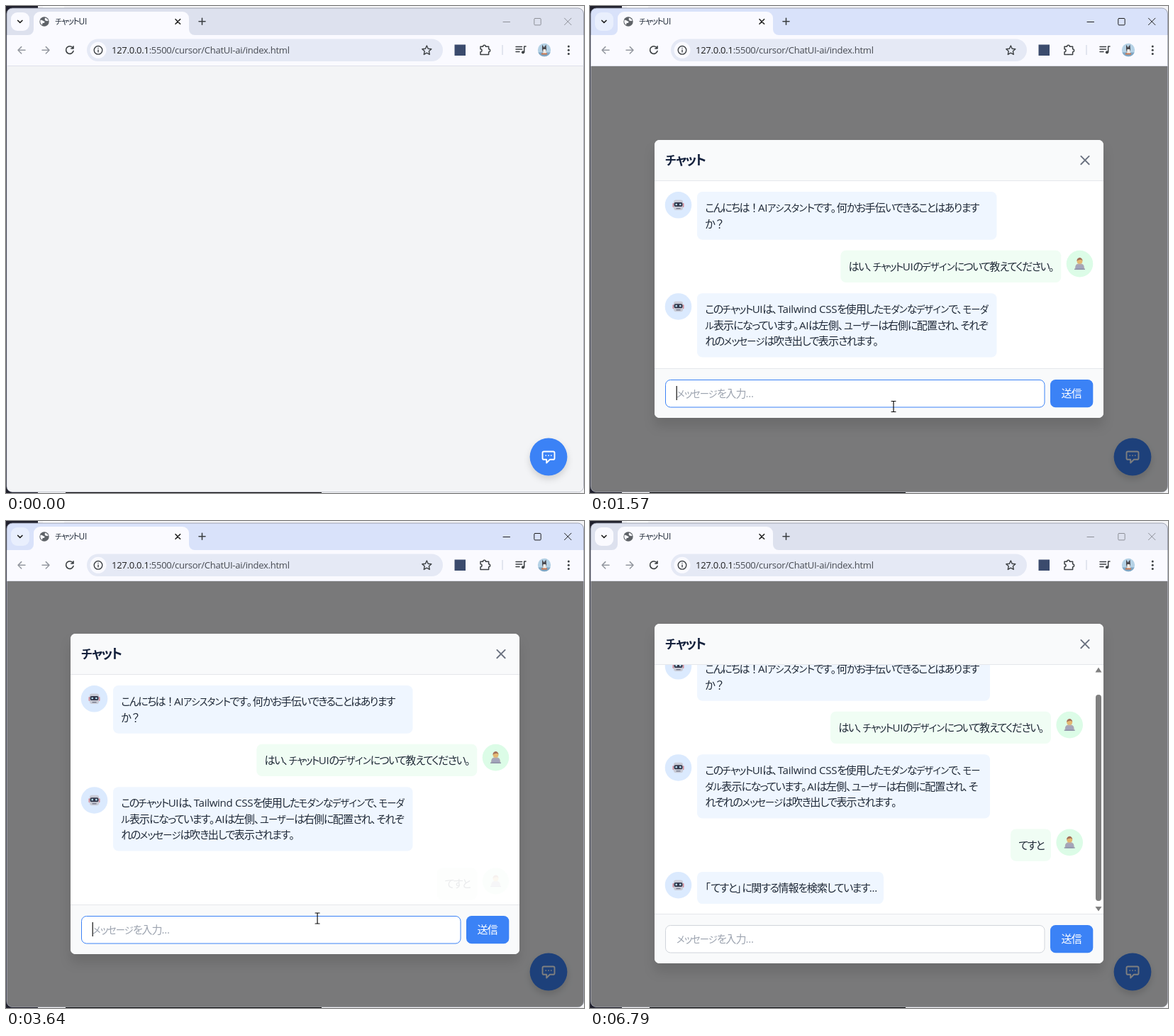
An HTML page for the animation above (6920 ms loop, 815x687 px).

```html
<!DOCTYPE html>
<html lang="ja">
<head>
<meta charset="utf-8">
<title>チャットUI</title>
<style>
html, body { margin: 0; width: 100%; height: 100%; overflow: hidden; background: #fff; }
svg { display: block; width: 815px; height: 687px; }
text { font: 15.07px "Open Sans", "Noto Sans CJK JP", "Noto Sans CJK", sans-serif; font-feature-settings: "palt"; fill: #1f2937; white-space: pre; }
.title { font-size: 18.84px; font-weight: 600; fill: #14213d; }
.kata { font-size: .88em; letter-spacing: -.06em; }
.hira { letter-spacing: -.11em; }
.kanji { letter-spacing: -.06em; }
.mark { letter-spacing: .04em; }
.wide { letter-spacing: -.14em; font-feature-settings: normal; }
.latin { letter-spacing: -.02em; }
.line { fill: none; stroke-linecap: round; stroke-linejoin: round; }
</style>
</head>
<body>
<svg id="stage" viewBox="0 0 815 687" xmlns="http://www.w3.org/2000/svg"></svg>
<script>
const LOOP = 6920, MID = 385, LEFT = 91, WIDTH = 633, PITCH = 22.6;
const HEIGHTS = { 3: 392, 4: 452, 5: 479 };
const $ = id => document.getElementById(id);
const set = (id, attrs) => { for (const k in attrs) $(id).setAttribute(k, attrs[k]); };
const show = (id, on) => set(id, { display: on ? 'inline' : 'none' });
const clamp = v => Math.max(0, Math.min(1, v));
const smooth = p => p * p * (3 - 2 * p);
const easeOut = p => 1 - Math.pow(1 - p, 1.7);

// Spacing follows the script: katakana is narrower than hiragana and kanji.
function kind(c) {
  if (/[ -~]/.test(c)) return 'latin';
  if (/[！？]/.test(c)) return 'wide';
  if (/[、。「」]/.test(c)) return 'mark';
  if (/[一-龠]/.test(c)) return 'kanji';
  return /[ァ-ヺー]/.test(c) && !/[ャュョット]/.test(c) ? 'kata' : 'hira';
}
function rich(s) {
  const runs = [];
  for (const c of s) {
    const k = kind(c), last = runs[runs.length - 1];
    if (last && last.k === k) last.s += c; else runs.push({ k, s: c });
  }
  return runs.map(r => `<tspan class="${r.k}">${r.s}</tspan>`).join('');
}
const text = (x, y, s, more = '') => `<text x="${x}" y="${y}" ${more}>${rich(s)}</text>`;
const rect = (x, y, w, h, fill, more = '') => `<rect x="${x}" y="${y}" width="${w}" height="${h}" fill="${fill}" ${more}/>`;
const circle = (x, y, r, fill, more = '') => `<circle cx="${x}" cy="${y}" r="${r}" fill="${fill}" ${more}/>`;
const line = (d, color, w = 1.5, more = '') => `<path class="line" d="${d}" stroke="${color}" stroke-width="${w}" ${more}/>`;
const fill = (d, color, more = '') => `<path d="${d}" fill="${color}" ${more}/>`;

const DARK = '#3c4043', GREY = '#9498a0';
const PAGE = 'M1.4 85h812.8v593a7.5 7.5 0 0 1-7.5 7.5H9a7.5 7.5 0 0 1-7.6-7.5z';

function chrome() {
  return rect(0, 0, 815, 687, '#f4f4f6') + rect(0, 0, 45, 687, '#20202c') +
    rect(52, 0, 30, 3, '#fff') + rect(84, 684, 361, 3, '#0c0c0e') +
    `<rect id="strip" x="1" y="3" width="813.5" height="682.5" rx="8" stroke="#8b90a0" stroke-width=".8"/>` +
    rect(1.4, 41, 812.8, 44, '#fafaff') +
    fill('M31 41a8 8 0 0 0 8-8V17a9 9 0 0 1 9-9h201a9 9 0 0 1 9 9v16a8 8 0 0 0 8 8z', '#fafaff') +
    `<rect id="drop" x="7" y="9" width="26" height="26" rx="9"/>` +
    line('M16.7 20.5l3.1 3 3.1-3', '#1f1f1f', 1.7) +
    circle(54, 22, 6.7, '#5f6368') +
    fill('M48.5 20c2.5-1 3 1 5 1.5s1 2.5-1 2.5-.5 2.5-2 2.5c-2-2-2.5-4-2-6.5zM55 16.8c2.5.5 4 2 4.5 4-1.5 1-2 0-3 0s-2.5-1.5-1.5-4z', '#fafaff') +
    text(69, 26.2, 'チャットUI', 'style="font-size:12px"') +
    line('M239 18.7l6.6 6.6m0-6.6l-6.6 6.6', '#1f1f1f', 1.6) +
    line('M272 21.7h9M276.5 17.2v9', DARK, 1.6) +
    `<path id="controls" class="line" stroke-width="1" d="M701 22.5h9.5M746 17.5h7a1.2 1.2 0 0 1 1.2 1.2v7a1.2 1.2 0 0 1-1.2 1.2h-7a1.2 1.2 0 0 1-1.2-1.2v-7a1.2 1.2 0 0 1 1.2-1.2zM787.5 17.2l9.5 9.5m0-9.5l-9.5 9.5"/>` +
    line('M27 62.3H17m4.7-4.7L17 62.3l4.7 4.7', GREY) +
    line('M51 62.3h10m-4.7-4.7l4.7 4.7-4.7 4.7', GREY) +
    line('M94.2 59a5.3 5.3 0 1 0 .8 4.5M95 56.8v3.2h-3.2', DARK, 1.6) +
    rect(114, 46.5, 502, 31.5, '#e5e9f5', 'rx="15.7"') + circle(130, 62.3, 11.5, '#fafaff') +
    circle(130, 62.3, 5.8, 'none', `stroke="${DARK}" stroke-width="1.4"`) + line('M130 61.9v3M130 59.5v.1', DARK, 1.4) +
    `<text x="149" y="67" class="latin" style="font-size:13px;fill:#474b52"><tspan fill="#1f1f1f">127.0.0.1</tspan>:5500/cursor/ChatUI-ai/index.html</text>` +
    line('M593.3 56l1.9 4.2 4.6.5-3.4 3.1.9 4.6-4-2.3-4 2.3.9-4.6-3.4-3.1 4.6-.5z', DARK, 1.4) +
    rect(632.5, 54.5, 15.5, 15.5, '#3b4b6d') +
    line('M669 57.2h3.6a1.9 1.9 0 0 1 3.8 0h4.2v3.6a2 2 0 0 1 0 4v3.7H669v-3.7a2 2 0 0 0 0-4z', DARK) +
    rect(699.5, 55, 1, 14, '#c9cfe0') +
    line('M719 57.5h8.5M719 61h8.5M719 64.5h5', DARK) +
    line('M730.7 65v-8h2.3', DARK) + circle(729, 65.3, 2.1, DARK) +
    circle(759, 62, 9.2, '#b5d2e6') +
    fill('M750.5 65.5h17a9.2 9.2 0 0 1-17 0z', '#7fa6c4') + fill('M756 54.5l2.5 4 3-4 .5 7-1.5 6h-3l-1.5-6z', '#4b4a50') +
    fill('M757.5 61h3.5l1 6h-5z', '#f0ede8') + rect(755, 66.5, 8, 2, '#c87852') +
    [57, 62.3, 67.6].map(y => circle(793.3, y, 1.5, DARK)).join('') +
    rect(1.4, 84, 812.8, 1, '#dfe1ea') +
    fill(PAGE, '#f3f4f6') +
    `<g style="filter:drop-shadow(0 5px 5px rgba(0,0,0,.14))"><circle id="fab" cx="765" cy="636" r="26.4"/></g>` +
    line('M8 10h.01M12 10h.01M16 10h.01M9 16H5a2 2 0 0 1-2-2V6a2 2 0 0 1 2-2h14a2 2 0 0 1 2 2v8a2 2 0 0 1-2 2h-5l-5 5v-5z',
      '#fff', 2, 'transform="translate(753.7 624.7) scale(.942)"') +
    fill(PAGE, '#000', 'id="shade" opacity=".5"');
}

const robot = rect(-8, -2.5, 3, 6, '#d58a97', 'rx="1"') + rect(5, -2.5, 3, 6, '#d58a97', 'rx="1"') +
  rect(-6.5, -7, 13, 14.5, '#c9cbd6', 'rx="3"') + rect(-6, -3.5, 12, 6, '#33384c', 'rx="2"') +
  circle(-2.8, -.5, 1.3, '#b9e2f4') + circle(2.8, -.5, 1.3, '#b9e2f4') + rect(-3, 4.5, 6, 1.3, '#6f7386');
const person = fill('M-6.5 7.5c0-6 2.5-7.5 6.5-7.5s6.5 1.5 6.5 7.5z', '#b3a9ae') +
  circle(0, -3.5, 4, '#e4b872') + fill('M-4-3.5a4 4.5 0 0 1 8-.5l-2-1.5-3.5.5z', '#a3705a') +
  rect(-5.5, 2.2, 11, 6, '#a3a5bb', 'rx="1"') + rect(-7.5, 7.2, 15, 1.3, '#8789a0');

const hello = ['こんにちは！AIアシスタントです。何かお手伝いできることはあります', 'か？'];
const about = 'このチャットUIは、Tailwind CSSを使用したモダンなデザインで、モーダル表示になっています。AIは左側、ユーザーは右側に配置され、それぞれのメッセージは吹き出しで表示されます。';
const cut = (s, ...ends) => {
  const at = ends.map(e => s.indexOf(e));
  return [s.slice(0, at[0]), s.slice(at[0], at[1]), s.slice(at[1])];
};

function messages(scrolls) {
  const wide = scrolls ? 413 : 422.5;
  return [
    { lines: hello, w: wide },
    { lines: ['はい、チャットUIのデザインについて教えてください。'], w: 311, mine: true },
    { lines: scrolls ? cut(about, 'ダル表', 'れぞれ') : cut(about, 'ル表', 'れのメ'), w: wide },
    { lines: ['てすと'], w: 57, mine: true },
    { lines: ['「てすと」に関する情報を検索しています...'], w: 263 }
  ];
}

function bubble(m, i, y, right) {
  const h = (m.lines.length + 1) * PITCH, x = m.mine ? right - 45 - m.w : 151;
  const face = m.mine ? right - 18.8 : 124.5;
  return `<g id="msg${i}">` + circle(face, y + 18.8, 18.8, m.mine ? '#dcfce7' : '#dbeafe') +
    `<g transform="translate(${face} ${y + 18.5})">${m.mine ? person : robot}</g>` +
    rect(x, y, m.w, h, m.mine ? '#f0fdf4' : '#eff6ff', 'rx="7.5"') +
    m.lines.map((s, n) => text(x + 11.3, y + 28 + n * PITCH, s)).join('') + '</g>';
}

const edge = (count, side) => Math.floor(MID + side * HEIGHTS[count] / 2);

function modal(count) {
  const scrolls = count === 5, top = edge(count, -1), end = edge(count, 1);
  const h = end - top, right = scrolls ? 695 : 709.3;
  let y = top + 73 - (scrolls ? 32 : 0), list = '';
  messages(scrolls).slice(0, count).forEach((m, i) => {
    list += bubble(m, i, y, right);
    y += (m.lines.length + 1) * PITCH + 15.07;
  });
  const bar = scrolls ? rect(713, 245, 8, 291, '#808080', 'rx="4"') +
    fill('M717 206.5l4.5 7h-9zM717 550.5l4.5-6.5h-9z', '#808080') : '';
  return `<clipPath id="card"><rect x="${LEFT}" y="${top}" width="${WIDTH}" height="${h}" rx="7"/></clipPath>` +
    `<clipPath id="body"><rect x="${LEFT}" y="${top + 58}" width="${WIDTH}" height="${h - 128}"/></clipPath>` +
    `<g style="filter:drop-shadow(0 12px 8px rgba(0,0,0,.11))"><g clip-path="url(#card)">` +
    rect(LEFT, top, WIDTH, h, '#fff') + rect(LEFT, top, WIDTH, 57, '#f9fafb') + rect(LEFT, end - 70, WIDTH, 70, '#f9fafb') +
    rect(LEFT, top + 57, WIDTH, 1, '#e5e7eb') + rect(LEFT, end - 70, WIDTH, 1, '#e5e7eb') + '</g></g>' +
    text(106, top + 35.3, 'チャット', 'class="title"') +
    line('M6 18L18 6M6 6l12 12', '#6b7280', 2, `transform="translate(686.7 ${top + 17.3}) scale(.942)"`) +
    `<g clip-path="url(#body)">${list}</g>${bar}` +
    `<rect id="field" x="106.5" y="${end - 53.5}" width="534.5" height="38.5" rx="7" fill="#fff" stroke-width="1"/>` +
    rect(649, end - 54, 60.3, 39.3, '#3b82f6', 'rx="7.5"') +
    text(664.5, end - 29, '送信', 'style="fill:#fff"') +
    text(122, end - 29, 'メッセージを入力...', 'id="hint" style="fill:#9ca3af"') +
    `<text id="typed" x="122" y="${end - 29}"></text>` +
    line('', '#1f2937', 1, 'id="under" stroke-dasharray="1.5 2"') +
    `<rect id="caret" y="${end - 45}" width="1.2" height="20" fill="#111"/>`;
}

const typing = [[2370, 'ｔ'], [2440, 'て'], [2570, 'てｓ'], [2640, 'てす'], [2770, 'てすｔ'], [2840, 'てすと']];
const guesses = {
  'て': ['てすと', '添付', '程度', '提出'],
  'てす': ['てすと', 'テスト', '手数料', 'テスト中'],
  'てすと': ['てすと', 'テスト', 'テストデータ', 'テスト結果を']
};

function popup(word) {
  const items = guesses[word.replace(/[ｔｓ]$/, '')];
  if (!items) return '';
  const w = word.length > 1 ? 201 : 153.5, r = 100 + w;
  return `<g style="filter:drop-shadow(0 2px 3px rgba(0,0,0,.25))">${rect(100, 557, w, 140, '#f9f9f9', 'rx="6"')}</g>` +
    items.map((s, i) => {
      const y = 574 + i * 30;
      return `<text x="114" y="${y + 5}" style="font-size:13px;fill:#8a8a8a">${i + 1}</text>` + text(130, y + 5.5, s, 'style="font-size:14.5px"') +
        circle(r - 37, y - 1, 3.7, 'none', 'stroke="#777"') + line(`M${r - 34.3} ${y + 1.7}l3.5 3.5`, '#777', 1.1);
    }).join('') +
    [0, 1, 2, 3, 4].map(i => circle(r - 11.3, 611.5 + i * 11.4, i ? 1.7 : 2.7, '#777')).join('');
}

const path = [[390, 740, 700], [620, 765, 645], [860, 765, 645], [1490, 428, 565], [1690, 428, 565],
  [1830, 439.5, 560.5], [5890, 438.5, 560.5], [6480, 756, 700]];
function pointer(t) {
  let i = 0;
  while (i < path.length - 2 && t > path[i + 1][0]) i++;
  const [a, b] = [path[i], path[i + 1]], p = smooth(clamp((t - a[0]) / (b[0] - a[0])));
  return [a[1] + (b[1] - a[1]) * p, a[2] + (b[2] - a[2]) * p];
}

const arrow = fill('M0 0v16.5l3.8-3.5 2.5 5.8 2.7-1.2L6.5 12h5.2z', '#fff', 'id="arrow" stroke="#111" stroke-width="1"');
const beam = line('M-3-7.5h2.3L0-7l.7-.5H3M0-7V7M-3 7.5h2.3L0 7l.7.5H3', '#111', 1.2, 'id="beam"');
const hand = fill('M0 0c1.2-.8 2.3 0 2.3 1.5V7l6 1.2c1.5.4 2 1.3 1.8 2.8L9 17H1.5L-3.5 10.5c-.6-1.5 1-2 2-1.2L-.7 10V1.5z', '#fff', 'id="hand" stroke="#111"');

$('stage').innerHTML = chrome() + '<g id="dialog"></g><g id="ime"></g><g id="mouse">' + arrow + beam + hand + '</g>';

const mix = (a, b, p) => `rgb(${a.map((v, i) => Math.round(v + (b[i] - v) * p))})`;

// The caret blinks about every 530 ms, restarting at the click and at each key.
function caretOn(t) {
  if (t < 1510 || t >= 6700) return false;
  const from = t < 2370 ? 1510 : t < 3260 ? t : 3260;
  return Math.floor((t - from) / 532) % 2 === 0;
}

let built = 0, shown = null;
function render(t) {
  const active = t >= 260 && t < 6790, open = t >= 700;
  const count = t < 3625 ? 3 : t < 4645 ? 4 : 5;
  set('strip', { fill: active ? '#d9e2fa' : '#dde1ee' });
  set('drop', { fill: active ? '#e9effd' : '#fafaff' });
  set('controls', { stroke: active ? '#1f1f1f' : '#8d9098' });
  const hover = clamp((t - 540) / 150) - clamp((t - 900) / 150);
  set('fab', { fill: mix([59, 130, 246], [37, 99, 235], hover) });
  show('shade', open);
  show('dialog', open);

  if (built !== count) {
    $('dialog').innerHTML = modal(count);
    built = count;
    shown = null;
  }
  const born = [700, 700, 700, 3625, 4645];
  for (let i = 0; i < count; i++) {
    const p = easeOut(clamp((t - born[i]) / 300));
    set('msg' + i, { opacity: p, transform: `translate(0 ${9.4 * (1 - p)})` });
  }

  const focus = t >= 1510 && t < 6790;
  set('field', { stroke: focus ? '#3b82f6' : '#d1d5db' });
  const word = t < 3625 ? typing.reduce((s, k) => t >= k[0] ? k[1] : s, '') : '';
  const composing = t < 3240;
  const key = word + composing;
  if (shown !== key) {
    $('typed').innerHTML = rich(word);
    $('ime').innerHTML = composing ? popup(word) : '';
    const w = word ? $('typed').getComputedTextLength() : 0;
    set('caret', { x: 121.6 + w });
    set('under', { d: composing && word ? `M122 555h${w}` : 'M0 0' });
    show('hint', !word);
    shown = key;
  }
  show('caret', caretOn(t));

  const [x, y] = pointer(t), end = edge(count, 1);
  const overField = open && x > 106 && x < 641 && y > end - 54 && y < end - 15;
  const overFab = !open && Math.hypot(x - 765, y - 636) < 26.4;
  show('mouse', t > 390 && t < 6480);
  set('mouse', { transform: `translate(${x} ${y})` });
  show('beam', overField);
  show('hand', overFab);
  show('arrow', !overField && !overFab);
}

const start = performance.now();
function tick() {
  render((performance.now() - start) % LOOP);
  requestAnimationFrame(tick);
}
tick();
</script>
</body>
</html>
```
